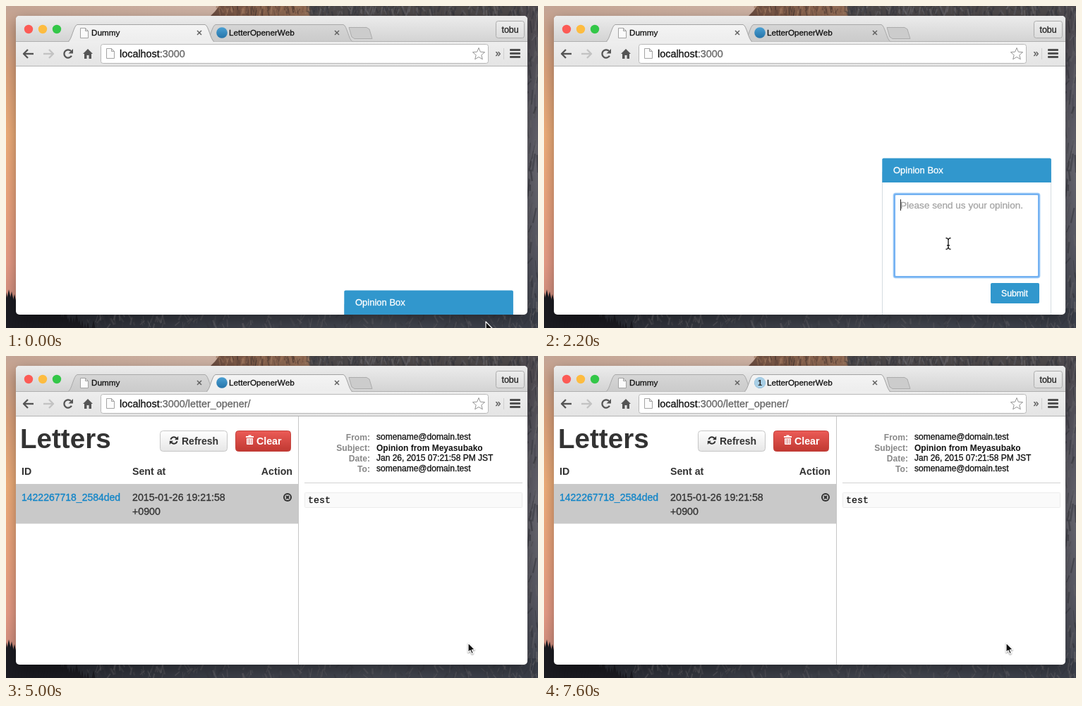
Recreate the animation shown at these times as an HTML page with a canvas. Size 754 by 458 pixels, loop 7.8 s.

```html
<!DOCTYPE html>
<html lang="en">
<head>
<meta charset="utf-8">
<title>Opinion Box</title>
<style>
html, body { margin: 0; width: 100%; height: 100%; overflow: hidden; }
canvas { display: block; }
</style>
</head>
<body>
<canvas id="stage" width="754" height="458"></canvas>
<script>
const W = 754, H = 458, LOOP = 7800, STEP = 200;
const SANS = '"Liberation Sans", Arial, sans-serif';
const MONO = '"Liberation Mono", "Courier New", monospace';
const BLUE = [49, 151, 205], DARK_BLUE = [46, 135, 181];
const stage = document.getElementById('stage').getContext('2d');
let g = stage;

const clamp = v => Math.max(0, Math.min(1, v));
const prog = (t, a, b) => clamp((t - a) / (b - a));
const ease = p => 0.5 - Math.cos(p * Math.PI) / 2;
const mix = (a, b, p) => a + (b - a) * p;
const mixColor = (a, b, p) => `rgb(${a.map((v, i) => Math.round(mix(v, b[i], p))).join()})`;

function vgrad(y0, y1, ...colors) {
  const gr = g.createLinearGradient(0, y0, 0, y1);
  colors.forEach((c, i) => gr.addColorStop(i / (colors.length - 1), c));
  return gr;
}
function hgrad(x0, x1, ...colors) {
  const gr = g.createLinearGradient(x0, 0, x1, 0);
  colors.forEach((c, i) => gr.addColorStop(i / (colors.length - 1), c));
  return gr;
}
function rect(x, y, w, h, fill) {
  g.fillStyle = fill;
  g.fillRect(x, y, w, h);
}
function box(x, y, w, h, r, fill, stroke) {
  g.beginPath();
  g.roundRect(x, y, w, h, r);
  if (fill) { g.fillStyle = fill; g.fill(); }
  if (stroke) { g.strokeStyle = stroke; g.lineWidth = 1; g.stroke(); }
}
function shape(points, fill, stroke, lw = 1, open = false) {
  g.beginPath();
  points.forEach(([x, y], i) => i ? g.lineTo(x, y) : g.moveTo(x, y));
  if (!open) g.closePath();
  if (fill) { g.fillStyle = fill; g.fill(); }
  if (stroke) { g.strokeStyle = stroke; g.lineWidth = lw; g.stroke(); }
}
function disc(x, y, r, fill) {
  g.beginPath();
  g.arc(x, y, r, 0, 7);
  g.fillStyle = fill;
  g.fill();
}
// A hairline outline gives the slightly heavy look of smoothed screen type
function text(s, x, y, size, color, weight = '', align = 'left', family = SANS) {
  g.font = `${weight} ${size}px ${family}`;
  g.fillStyle = g.strokeStyle = color;
  g.textAlign = align;
  g.lineWidth = 0.3;
  g.lineJoin = 'round';
  g.fillText(s, x, y);
  if (!weight) g.strokeText(s, x, y);
  return g.measureText(s).width;
}

function rng(seed) {
  return () => (seed = (seed * 16807) % 2147483647) / 2147483647;
}

// Dusk sky, lit cliff, grey rock and a dark tree line
function drawBackdrop() {
  const rnd = rng(77);
  rect(0, 0, W, H, vgrad(0, H, '#c4a596', '#dca27c', '#efae7a', '#eda57e', '#e79c86', '#c4877c'));
  rect(14, 0, 300, 20, hgrad(0, 300, '#c5a493', '#cdb2a4'));
  shape([[302, 0], [296, 8], [288, 16], [288, 30], [W, 30], [W, 0]], hgrad(290, 430, '#6b4c40', '#84604c', '#94705a'));
  shape([[425, 0], [436, 30], [W, 30], [W, 0]], '#4c4849');
  rect(730, 0, 24, H, vgrad(0, H, '#4f4a4e', '#585660', '#66656e', '#595963', '#41454f'));
  rect(60, 430, 700, 28, hgrad(60, W, '#272a32', '#3b3e47', '#43464f', '#3a3e48'));
  const streak = (x, y, len, slant, color) =>
    shape([[x, y], [x + slant, y + len]], null, color, 0.8 + rnd() * 2, true);
  const warm = ['#9a7157', '#5c4238', '#8b654e', '#a98469', '#453732'];
  const cool = ['#3b3c43', '#66656a', '#34353c', '#6d6b70', '#55545a'];
  const pick = list => list[Math.floor(rnd() * list.length)];
  g.globalAlpha = 0.55;
  for (let i = 0; i < 110; i++) streak(300 + rnd() * 130, rnd() * 10 - 4, 4 + rnd() * 10, rnd() * 8 - 4, pick(warm));
  for (let i = 0; i < 200; i++) streak(432 + rnd() * 322, rnd() * 12 - 4, 4 + rnd() * 10, rnd() * 10 - 5, pick(cool));
  for (let i = 0; i < 100; i++) streak(738 + rnd() * 16, rnd() * H, 6 + rnd() * 22, rnd() * 10 - 7, pick(cool));
  g.globalAlpha = 0.4;
  for (let i = 0; i < 200; i++) streak(90 + rnd() * 664, 436 + rnd() * 18, 4 + rnd() * 10, rnd() * 14 - 7, pick(cool));
  g.globalAlpha = 1;
  for (let x = -4; x < 125; x += 4) {
    const y = 396 + Math.max(0, x) * 0.4 + rnd() * 12;
    shape([[x - 7, H], [x - 4, y + 18], [x, y], [x + 4, y + 18], [x + 7, H]], '#1b1b21');
  }
  g.save();
  g.shadowColor = 'rgba(0,0,0,.36)';
  g.shadowBlur = 20;
  g.shadowOffsetY = 7;
  box(14, 14, 725, 425, 5, '#fff');
  g.restore();
}

function tab(x, w, on) {
  g.beginPath();
  g.moveTo(x, 50.5);
  g.bezierCurveTo(x + 5, 49, x + 8, 27, x + 13, 26.5);
  g.lineTo(x + w - 13, 26.5);
  g.bezierCurveTo(x + w - 8, 27, x + w - 5, 49, x + w, 50.5);
  g.fillStyle = on ? vgrad(26, 51, '#f4f4f4', '#ededed') : vgrad(26, 51, '#d6d6d6', '#cbcbcb');
  g.fill();
  g.strokeStyle = on ? '#a2a2a2' : '#a9a9a9';
  g.lineWidth = 1;
  g.stroke();
}
function pageIcon(x, y) {
  shape([[x, y], [x + 7, y], [x + 11, y + 4], [x + 11, y + 14], [x, y + 14]], '#fbfbfb', '#a3a3a3');
  shape([[x + 7, y], [x + 7, y + 4], [x + 11, y + 4]], '#e6e6e6', '#a3a3a3');
}
function cross(x, y) {
  for (const s of [-1, 1]) shape([[x - 3, y - 3 * s], [x + 3, y + 3 * s]], null, '#606060', 1.5, true);
}
function arrowIcon(x, dir, color) {
  shape([[x - 7 * dir, 68], [x + 7 * dir, 68]], null, color, 2.4, true);
  shape([[x + dir, 62], [x + 7 * dir, 68], [x + dir, 74]], null, color, 2.4, true);
}

function drawChrome(letters, badge) {
  box(14, 14, 725, 72, [5, 5, 0, 0], vgrad(14, 51, '#ececec', '#d3d3d3'));
  ['#fc5b56', '#fdbc40', '#33c748'].forEach((c, i) => disc(32 + i * 20, 33, 6.2, c));
  shape([[486, 30.5], [511, 30.5], [515, 33], [519, 46.5], [494, 46.5], [490, 44]], '#cccccc', '#acacac');

  rect(14, 50, 725, 1, '#b0b0b0');
  tab(letters ? 88 : 284, 207, false);
  rect(14, 51, 725, 34, vgrad(51, 85, '#eeeeee', '#e4e4e4'));
  rect(14, 85, 725, 1, '#b4b4b4');
  tab(letters ? 284 : 88, 207, true);
  rect(letters ? 286 : 90, 50, 203, 2, '#eeeeee');

  pageIcon(105.5, 31.5);
  text('Dummy', 121, 42, 11.7, '#111');
  cross(274, 38);
  disc(306, 38, 7.8, vgrad(30, 46, '#4ba1d4', '#2573a8'));
  if (badge) {
    g.globalAlpha = badge;
    disc(306, 38, 7.8, '#a9cfe6');
    text('1', 306, 42, 11, '#222', 'bold', 'center');
    g.globalAlpha = 1;
  }
  text('LetterOpenerWeb', 316, 42, 11.7, '#111');
  cross(469, 38);
  box(694.5, 21.5, 40, 24, 3, vgrad(21, 46, '#ededed', '#dcdcdc'), '#acacac');
  text('tobu', 714.5, 38, 12.4, '#222', '', 'center');

  arrowIcon(32, -1, '#555');
  arrowIcon(60, 1, '#c3c3c3');
  g.beginPath();
  g.arc(88, 68, 5.6, 0.5, 5.5);
  g.strokeStyle = '#555';
  g.lineWidth = 2.3;
  g.stroke();
  shape([[95, 61], [95, 67.5], [88.5, 67.5]], '#555');
  shape([[116, 61], [123, 68], [121, 68], [121, 75], [117.5, 75], [117.5, 70], [114.5, 70], [114.5, 75], [111, 75], [111, 68], [109, 68]], '#555');

  box(134.5, 54.5, 549, 27, 3, '#fff', '#b8b8b8');
  pageIcon(142.5, 60.5);
  const w = text('localhost', 161, 73, 14.4, '#111');
  text(letters ? ':3000/letter_opener/' : ':3000', 161 + w, 73, 14.4, '#666');
  const star = Array.from({ length: 10 }, (_, i) => {
    const a = i * Math.PI / 5 - Math.PI / 2, r = i % 2 ? 4 : 9;
    return [670 + r * Math.cos(a), 68.5 + r * Math.sin(a)];
  });
  shape(star, '#fff', '#959595');
  text('»', 697.5, 72, 14, '#555', '', 'center');
  rect(705, 60, 1, 16, '#cfcfcf');
  for (let i = 0; i < 3; i++) box(714, 61 + i * 5, 15, 3, 1, '#505050');
}

const TYPED = [2400, 2520, 2660, 2800];

function drawOpinion(t) {
  const open = ease(prog(t, 1000, 1400));
  const thanks = ease(prog(t, 3800, 4200));
  const top = 404 - 188 * open - 40 * thanks;
  const hover = prog(t, 300, 500) * (1 - prog(t, 1650, 1900));
  const focus = t >= 2150 && t < 3500;

  g.save();
  g.beginPath();
  g.roundRect(14, 86, 725, 353, [0, 0, 5, 5]);
  g.clip();
  rect(479, top + 20, 1, 280, '#d5dce1');
  rect(718, top + 20, 1, 280, '#d5dce1');
  box(479.3, top + 0.4, 239.6, 34.6, [2, 2, 0, 0], mixColor(BLUE, DARK_BLUE, hover));
  text('Opinion Box', 495, top + 22, 13, '#fff');

  const y = top + 51 + 40 * thanks;
  if (thanks) {
    g.globalAlpha = thanks;
    rect(496, top + 51, 206, 32 * thanks, '#f2f7fc');
    text('Thank you for sending your opinion.', 504, top + 71, 11.3, '#2797cb');
    g.globalAlpha = 1;
  }
  if (focus) {
    box(494.5, y - 1.5, 209, 122, 4, '#b8d9fa');
    box(495.5, y - 0.5, 207, 120, 3, '#74b2f2');
    box(498, y + 2, 202, 115, 1, '#fff');
  } else {
    box(496.5, y + 0.5, 205, 118, 2, '#fff', '#c9c9c9');
  }
  const n = TYPED.filter(k => t >= k).length;
  let cx = 505;
  if (n) cx += text('test'.slice(0, n), 505, y + 21, 14.2, '#2c3e50');
  else text('Please send us your opinion.', 505, y + 21, 13.55, '#a5a5a5');
  const last = n ? TYPED[n - 1] : 2150;
  if (focus && (t - last) % 1000 < 500) rect(cx, y + 8, 1, 16, '#222');

  box(633, y + 127, 69, 29, 2, mixColor(BLUE, DARK_BLUE, prog(t, 3100, 3300)));
  text('Submit', 667, y + 146, 12.2, '#fff', '', 'center');
  g.restore();
}

function refreshIcon(x, y) {
  g.strokeStyle = '#333';
  g.lineWidth = 2;
  for (const a of [0, Math.PI]) {
    g.save();
    g.translate(x, y);
    g.rotate(a);
    g.beginPath();
    g.arc(0, 0, 4.7, 3.4, 5.6);
    g.stroke();
    shape([[6.2, -6], [6.2, -0.8], [1, -0.8]], '#333');
    g.restore();
  }
}

function drawLetters() {
  rect(414, 86, 1, 353, '#c6c6c6');
  text('Letters', 20, 131, 38.6, '#333', 'bold');
  box(218.5, 106.5, 95, 29, 4, vgrad(106, 136, '#ffffff', '#e6e6e6'), '#c6c6c6');
  refreshIcon(238, 120);
  text('Refresh', 249, 126, 14, '#333', 'bold');
  box(325.5, 106.5, 78, 29, 4, vgrad(106, 136, '#ec5c57', '#bf3831'), '#c4443e');
  rect(340, 114, 11, 2, '#fff');
  rect(343.5, 112.5, 4, 2, '#fff');
  box(341, 117, 9, 9, [0, 0, 1, 1], '#fff');
  for (let i = 0; i < 3; i++) rect(342.7 + i * 2.5, 118, 0.8, 7, '#d04a45');
  text('Clear', 355, 126, 14.2, '#fff', 'bold');

  text('ID', 22, 169, 14.2, '#333', 'bold');
  text('Sent at', 179, 169, 14.2, '#333', 'bold');
  text('Action', 406, 169, 14.2, '#333', 'bold', 'right');
  rect(14, 182, 400, 56.5, '#c9c9c9');
  text('1422267718_2584ded', 22, 206, 14, '#0f84c8');
  text('2015-01-26 19:21:58', 179, 206, 14.2, '#333');
  text('+0900', 179, 226, 14.2, '#333');
  disc(399, 201, 6, '#333');
  disc(399, 201, 4, '#c9c9c9');
  for (const s of [-1, 1]) shape([[397, 201 - 2 * s], [401, 201 + 2 * s]], null, '#333', 1.9, true);

  const mail = 'somename@domain.test';
  [['From:', mail], ['Subject:', 'Opinion from Meyasubako', 'bold'],
   ['Date:', 'Jan 26, 2015 07:21:58 PM JST'], ['To:', mail]].forEach(([k, v, weight], i) => {
    const y = 119 + i * 15;
    text(k, 516, y + 1, 12.1, '#888', 'bold', 'right');
    text(v, 525, y + (weight ? 1 : 0), 12, '#111', weight);
  });
  rect(423, 180, 309, 1, '#d2d2d2');
  box(423.5, 194.5, 308, 21, 1, '#fafafa', '#ececec');
  text('test', 428, 209, 13.3, '#111', '', 'left', MONO);
}

// Stops of the pointer: time of arrival, x, y
const PATH = [[0, 680, 449], [100, 680, 449], [800, 640, 416], [1600, 640, 416],
  [2050, 573, 338], [2850, 573, 338], [3300, 655, 408], [LOOP, 655, 408]];

function pointerAt(t) {
  const i = PATH.findIndex(p => p[0] > t);
  const a = PATH[i - 1], b = PATH[i], p = ease(prog(t, a[0], b[0]));
  return [mix(a[1], b[1], p), mix(a[2], b[2], p)];
}
function pointerKind(t, x, y) {
  if (t >= 5000) return 'arrow';
  if (t <= 1600) return y < 439 ? 'hand' : 'arrow';
  if (x > 496 && x < 702 && y > 267 && y < 386) return 'beam';
  return x > 633 && y > 394 ? 'hand' : 'arrow';
}
function drawPointer(t) {
  const [x, y] = pointerAt(t), kind = pointerKind(t, x, y);
  g.save();
  g.translate(x, y);
  g.lineJoin = 'round';
  if (kind === 'beam') {
    for (const [c, w] of [['rgba(255,255,255,.8)', 3], ['#111', 1.3]]) {
      for (const s of [-1, 1]) {
        shape([[-3.5, 8 * s], [-1.5, 7.6 * s], [0, 6 * s], [1.5, 7.6 * s], [3.5, 8 * s]], null, c, w, true);
      }
      shape([[0, -6], [0, 6]], null, c, w, true);
      shape([[-2, 2.5], [2, 2.5]], null, c, w, true);
    }
  } else {
    g.shadowColor = 'rgba(0,0,0,.35)';
    g.shadowBlur = 2;
    g.shadowOffsetY = 1;
    if (kind === 'hand') {
      shape([[-1.5, 1], [0, 0], [1.5, 1], [2.3, 6], [4, 5.4], [5, 6.6], [6.5, 6], [7.4, 7.4], [9, 7.5], [9.3, 10],
        [8, 13], [7.5, 16.5], [0.5, 16.5], [-1, 13.5], [-4.5, 9.5], [-3.5, 8], [-1.8, 8.6], [-0.2, 10]], '#fff', '#111', 1.1);
      g.shadowColor = 'transparent';
      for (const i of [1, 3.3, 5.6]) shape([[i, 11], [i, 14]], null, '#222', 0.9, true);
    } else {
      shape([[0, 0], [0, 13.5], [3, 10.8], [5.2, 15.6], [7.4, 14.6], [5.3, 10], [9.4, 9.6]], '#111', '#fff', 1.2);
    }
  }
  g.restore();
}

const backdrop = document.createElement('canvas');
backdrop.width = W;
backdrop.height = H;
g = backdrop.getContext('2d');
drawBackdrop();
g = stage;

function draw(now) {
  const t = Math.floor(now % LOOP / STEP) * STEP;
  const letters = t >= 5000;
  g.drawImage(backdrop, 0, 0);
  drawChrome(letters, prog(t, 7200, 7600));
  if (letters) drawLetters();
  else drawOpinion(t);
  drawPointer(t);
}

let start;
function tick(now) {
  start ??= now;
  draw(Math.max(0, now - start));
  requestAnimationFrame(tick);
}
draw(0);
requestAnimationFrame(tick);
</script>
</body>
</html>
```
